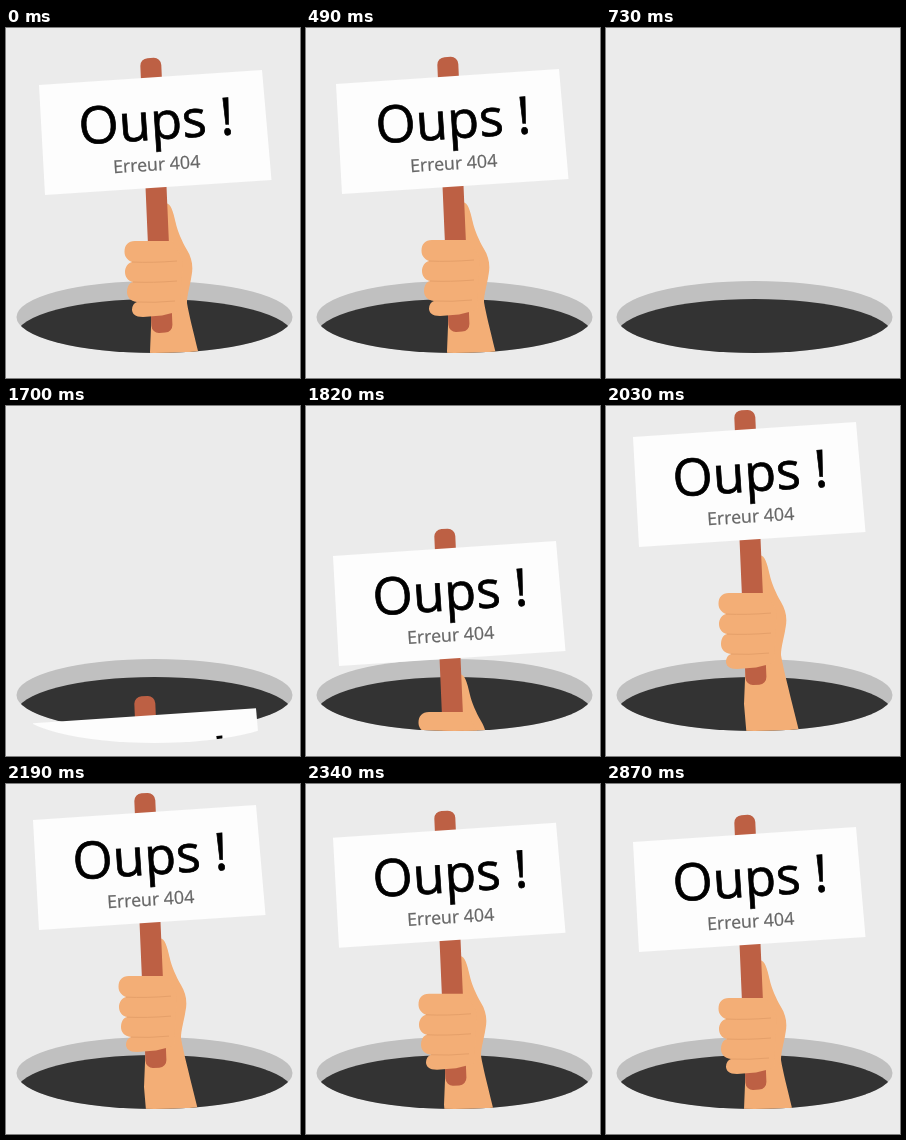
Write an HTML page that moves like this. It is 294 by 350 pixels and loops after 2960 ms.

```html
<!DOCTYPE html>
<html lang="fr">
<head>
<meta charset="utf-8">
<title>Erreur 404</title>
<style>
  html, body { margin: 0; width: 100%; height: 100%; overflow: hidden; background: #ebebeb; }
  svg { display: block; width: 100%; height: 100%; }
  text { font-family: "Open Sans", "Noto Sans", sans-serif; }
</style>
</head>
<body>
<svg viewBox="0 0 294 350">
  <defs>
    <clipPath id="rim"><ellipse cx="148.5" cy="289" rx="138" ry="36"/></clipPath>
    <clipPath id="armMask"><path d="M10.5 289A138 36 0 0 0 286.5 289V-50H10.5Z"/></clipPath>
    <clipPath id="signMask"><path d="M10.5 301A138 36 0 0 0 286.5 301V-50H10.5Z"/></clipPath>
  </defs>

  <ellipse cx="148.5" cy="289" rx="138" ry="36" fill="#c0c0c0"/>
  <ellipse cx="148.5" cy="307" rx="138" ry="36" fill="#333" clip-path="url(#rim)"/>

  <g clip-path="url(#armMask)">
    <g class="move">
      <path fill="#f3ae76" d="M154 176C159 177 161 184 163.5 195C166 206 170 214 175 223C180 231 181.5 240 179.5 249C178 259 175 268 175 276C177 288 181 303 186 324L198 372H142L138 325L139.5 288L141 215Z"/>
      <rect fill="#bd6044" x="128" y="31" width="21" height="275" rx="7.5" transform="rotate(-2.45 138.5 31)"/>
      <path fill="#f3ae76" d="M123 214H160L171 232L168 284L150 288.5L131 290C123 290 120 286.5 120 282.5C120 279 122 276 125 275C118 274 115 270 115 265C115 260 117 256 121 255C116 254 113 250 113 245C113 240 116 236 120 235C115 233 112.5 229 112.5 225C112.5 218 116 214 123 214Z"/>
      <path fill="none" stroke="#e5a06a" stroke-width="1" d="M120 235Q140 236 165 234M121 255Q140 256 165 254M125 275Q142 276 163 274"/>
    </g>
  </g>

  <g clip-path="url(#signMask)">
    <g class="move">
      <path fill="#fdfdfd" d="M27 58L250 43L259.5 153L33 168Z"/>
      <text transform="translate(67.8 117.6) rotate(-3.85)" font-size="51.6" fill="#000" stroke="#000" stroke-width=".7">Oups !</text>
      <text transform="translate(101.4 146.2) rotate(-3.6)" font-size="17.8" fill="#666" stroke="#666" stroke-width=".25">Erreur 404</text>
    </g>
  </g>
</svg>
<script>
  const LOOP = 2960;
  const parts = document.querySelectorAll('.move');

  // hold the value over n equal steps between a and b
  const snap = (t, a, b, n) => a + Math.floor((t - a) / (b - a) * n + 1e-6) * (b - a) / n;

  const backOut = u => {
    const c = 1.70158, v = Math.min(u, 1) - 1;
    return 1 + (c + 1) * v ** 3 + c * v * v;
  };

  // offset from the resting pose, or null while hidden
  function pose(t) {
    if (t < 540) {
      const n = t < 30 ? 0 : Math.min(12, 1 + Math.floor((t - 30) / 460 * 11 + 1e-6));
      return [6 * Math.cos(n * Math.PI * 11 / 36), -1 - n / 12];
    }
    if (t < 1700) return null;
    let s = t;
    if (t < 1930) s = snap(t, 1700, 1930, 6);
    else if (t < 2190) s = snap(t, 1930, 2190, 8);
    else if (t < 2240) s = 2190;
    else if (t < 2420) s = snap(t, 2240, 2420, 5);
    return [0, 308 * (1 - backOut((s - 1675) / 706))];
  }

  function draw(t) {
    const p = pose(t);
    for (const el of parts) {
      el.style.display = p ? '' : 'none';
      if (p) el.setAttribute('transform', `translate(${p[0].toFixed(2)} ${p[1].toFixed(2)})`);
    }
  }

  const start = performance.now();
  function tick() {
    draw((performance.now() - start) % LOOP);
    requestAnimationFrame(tick);
  }
  tick();
</script>
</body>
</html>
```
